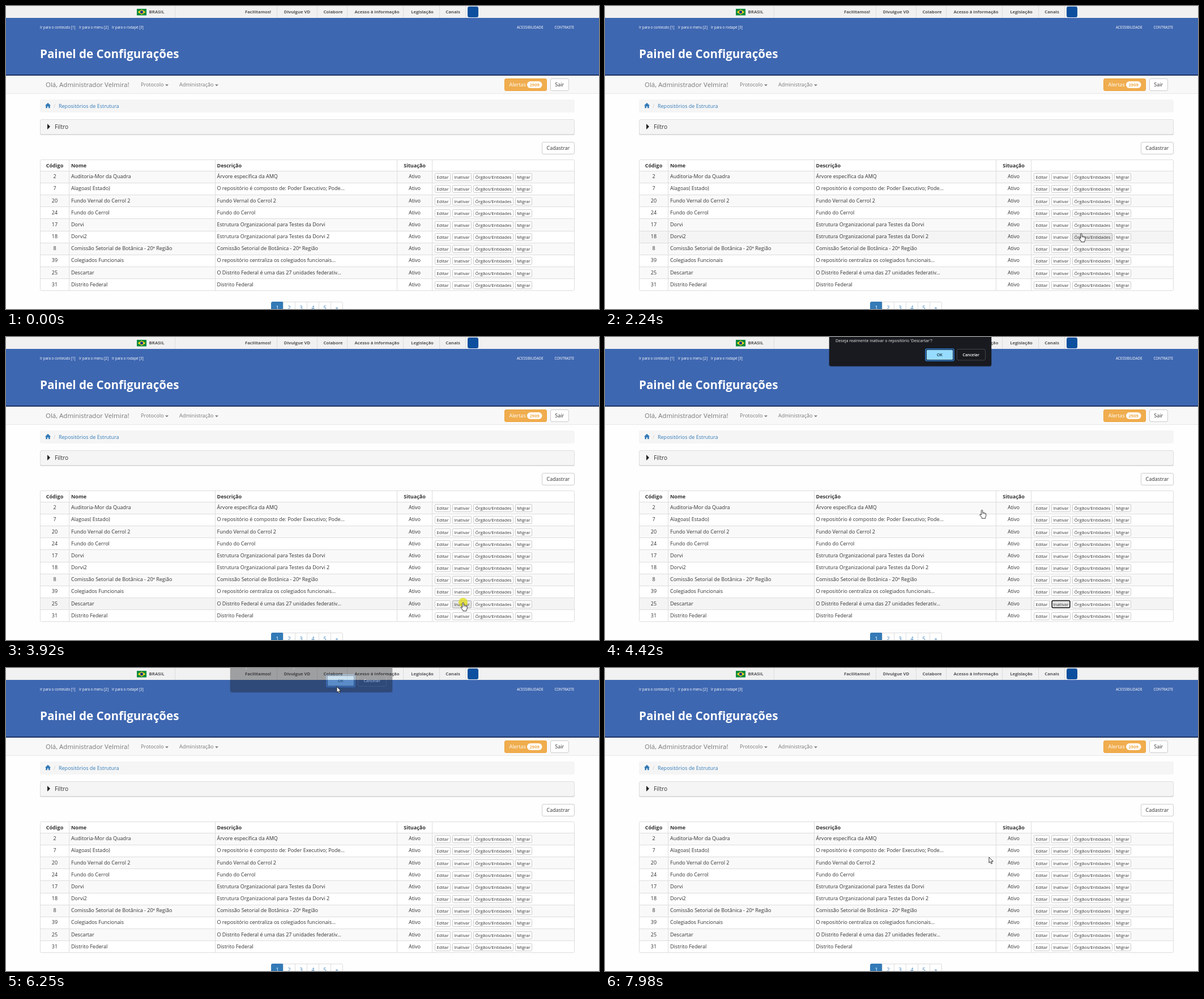
An HTML page that plays this animation: 1047x535 px, repeating every 8000 ms.

```html
<!DOCTYPE html>
<html lang="pt-BR">
<head>
<meta charset="utf-8">
<title>Repositórios de Estrutura</title>
<style>
  html, body { margin: 0; width: 100%; height: 100%; overflow: hidden; background: #fefefe; }
  svg { display: block; width: 1047px; height: 535px; font-family: "Open Sans", "Noto Sans", sans-serif; }
  text { white-space: pre; }
</style>
</head>
<body>
<svg id="stage" viewBox="0 0 1047 535"></svg>
<script>
const LOOP = 8000;
const stage = document.getElementById('stage');

function add(tag, attrs, parent = stage) {
  const node = document.createElementNS('http://www.w3.org/2000/svg', tag);
  for (const key in attrs) node.setAttribute(key, attrs[key]);
  return parent.appendChild(node);
}
const rect = (x, y, width, height, fill, extra = {}, parent) =>
  add('rect', { x, y, width, height, fill, ...extra }, parent);
const path = (d, fill, extra = {}, parent) => add('path', { d, fill, ...extra }, parent);
function text(x, y, content, size = 9, fill = '#333', extra = {}, parent) {
  const node = add('text', { x, y, 'font-size': size, fill, ...extra }, parent);
  node.textContent = content;
  return node;
}
const middle = { 'text-anchor': 'middle' };
const bold = { 'font-weight': 700 };
const boldMiddle = { ...middle, ...bold };
const box = (stroke, rx) => ({ stroke, rx });

// Government bar
rect(0, 0, 1047, 21, '#f1f1f1');
rect(231, 5, 17, 11.5, '#008a3e');
path('M232.5 10.7L239.5 6.3L246.5 10.7L239.5 15.2Z', '#f8d31c');
add('circle', { cx: 239.5, cy: 10.7, r: 2.6, fill: '#1f3a86' });
text(252.5, 13.4, 'BRASIL', 7.8, '#555', bold);
for (const x of [298, 478, 549, 602, 701, 765, 811]) rect(x, 0, 1, 21, '#dcdcdc');
[[445, 'Facilitamos!'], [514, 'Divulgue VD'], [577.5, 'Colabore'], [655, 'Acesso à informação'],
 [735, 'Legislação'], [789, 'Canais']]
  .forEach(([x, label]) => text(x, 13, label, 7.7, '#555', boldMiddle));
rect(815, 1, 19, 19, '#0c4f9e', { rx: 3 });

// Header
rect(0, 21, 1047, 101, '#3e67b1');
rect(0, 121, 1047, 2, '#1f3564');
[[60, 'Ir para o conteúdo [1]'], [129, 'Ir para o menu [2]'], [187, 'Ir para o rodapé [3]'],
 [902, 'ACESSIBILIDADE'], [968.5, 'CONTRASTE']]
  .forEach(([x, label]) => text(x, 40, label, 6.2, '#fff'));
text(60, 91.5, 'Painel de Configurações', 20.6, '#fff', bold);

// Navigation
rect(0, 123, 1047, 32, '#f8f8f8');
rect(0, 154, 1047, 1, '#e7e7e7');
text(70, 143, 'Olá, Administrador Velmira!', 11.5, '#777');
text(238, 142.3, 'Protocolo', 9, '#777');
text(306, 142.3, 'Administração', 9, '#777');
for (const x of [281, 369]) path(`M${x} 138.5h6l-3 3Z`, '#777');
rect(880.5, 128.5, 74, 21, '#f0ad4e', box('#eea236', 2.5));
text(888.5, 142.3, 'Alertas', 9, '#fff');
rect(920, 133, 26.5, 12, '#fff', { rx: 6 });
text(933.2, 141.9, '2909', 7.7, '#f0ad4e', boldMiddle);
rect(961.5, 128.5, 32, 21, '#fff', box('#ccc', 2.5));
text(977.3, 142.3, 'Sair', 9, '#333', middle);

// Breadcrumb, filter, action
rect(60, 165, 944, 23, '#f5f5f5', { rx: 2.5 });
path('M74 171L79 175.8H77.7V180.3H75V177.3H73V180.3H70.3V175.8H69Z', '#337ab7');
text(84, 179.6, '/', 9, '#ccc');
text(93, 179.6, 'Repositórios de Estrutura', 9, '#337ab7');
rect(60, 202, 944, 26, '#d9d9d9', { rx: 2.5 });
rect(60.5, 200.5, 943, 26, '#f5f5f5', box('#ddd', 2.5));
path('M73 208L78 213L73 218Z', '#222');
text(86, 216.8, 'Filtro', 10.2);
rect(946.5, 240.5, 57, 21, '#fff', box('#ccc', 2.5));
text(975, 254.3, 'Cadastrar', 9, '#333', middle);

// Table
const TOP = 291.3, PITCH = 21.17;
const entries = [
  [2, 'Auditoria-Mor da Quadra', 'Árvore específica da AMQ'],
  [7, 'Alagoas( Estado)', 'O repositório é composto de: Poder Executivo; Pode...'],
  [20, 'Fundo Vernal do Cerrol 2', 'Fundo Vernal do Cerrol 2'],
  [24, 'Fundo do Cerrol', 'Fundo do Cerrol'],
  [17, 'Dorvi', 'Estrutura Organizacional para Testes da Dorvi'],
  [18, 'Dorvi2', 'Estrutura Organizacional para Testes da Dorvi 2'],
  [8, 'Comissão Setorial de Botânica - 20ª Região', 'Comissão Setorial de Botânica - 20ª Região'],
  [39, 'Colegiados Funcionais', 'O repositório centraliza os colegiados funcionais...'],
  [25, 'Descartar', 'O Distrito Federal é uma das 27 unidades federativ...'],
  [31, 'Distrito Federal', 'Distrito Federal']
];
const actions = [['Editar', 757, 28], ['Inativar', 788, 34], ['Órgãos/Entidades', 825, 71], ['Migrar', 899, 30]];
const TARGET_ROW = 8, TARGET_ACTION = 1;

rect(60, 271, 944, 20, '#fff');
text(86, 284.6, 'Código', 9, '#333', boldMiddle);
text(115, 284.6, 'Nome', 9, '#333', bold);
text(372.5, 284.6, 'Descrição', 9, '#333', bold);
text(721.5, 284.6, 'Situação', 9, '#333', boldMiddle);

const rows = entries.map(([code, name, description], i) => {
  const top = TOP + i * PITCH;
  const line = Math.floor(top);
  const plain = i % 2 ? '#fff' : '#f9f9f9';
  const back = rect(60, line, 944, 22, plain);
  rect(60, line, 944, 1, '#ddd');
  text(86, top + 13, code, 9, '#333', middle);
  text(115, top + 13, name);
  text(372.5, top + 13, description);
  text(721.5, top + 13, 'Ativo', 9, '#333', middle);
  const buttons = actions.map(([label, x, w]) => {
    const face = rect(x + .5, Math.round(top + 4) + .5, w - 1, 13, '#fff', box('#ccc', 1.8));
    text(x + w / 2, top + 14, label, 7.7, '#333', middle);
    return face;
  });
  return { top, plain, back, buttons };
});
for (const x of [111, 369, 690, 752]) rect(x, 271, 1, 232, '#ddd');
rect(60.5, 271.5, 943, 231, 'none', box('#ddd', 2));

const focusRing = add('g');
rect(788.5, 464.8, 33, 14, 'none', { stroke: '#fff', rx: 2.5 }, focusRing);
rect(789.2, 465.5, 31.6, 12.6, 'none', { stroke: '#101010', 'stroke-width': 1.5, rx: 2 }, focusRing);

// Pagination
['1', '2', '3', '4', '5', '»'].forEach((label, i) => {
  const x = 468.5 + i * 21;
  rect(x, 522.5, 21, 21, i ? '#fff' : '#337ab7', box(i ? '#ddd' : '#337ab7', i % 5 ? 0 : 2));
  text(x + 10.5, 536.3, label, 9, i ? '#337ab7' : '#fff', middle);
});

// Confirmation dialog
const dialog = add('g');
rect(395, -20, 288, 72.5, '#000', { rx: 4, opacity: .25 }, dialog);
rect(396, -20, 286, 71.5, '#181a1f', { rx: 3.5 }, dialog);
text(407, 9, "Deseja realmente inativar o repositório 'Descartar'?", 7.17, '#f2f2f2', {}, dialog);
rect(566, 21, 50, 21, '#101216', { stroke: '#2f7fd6', 'stroke-width': 1.6, rx: 2.5 }, dialog);
const okFace = rect(567.8, 22.8, 46.4, 17.4, '#97dcff', { rx: 1.5 }, dialog);
text(590.8, 33.8, 'OK', 7.2, '#12303f', { ...middle, 'font-weight': 600 }, dialog);
rect(621.5, 21.5, 50, 19.5, '#181a1f', box('#42454b', 2.5), dialog);
text(646.2, 33.8, 'Cancelar', 7, '#fff', { ...middle, 'font-weight': 600 }, dialog);

// Pointer: origin is the hot spot
const pulse = add('circle', { r: 8, fill: '#e2de10', opacity: .72 });
const pointer = add('g');
const outline = { stroke: '#222', 'stroke-width': .9, 'stroke-linejoin': 'round' };
const arrow = path('M0 0V10.2L2.4 8L4 11.8L5.7 11L4.1 7.4H7.3Z', '#fff', outline, pointer);
const hand = add('g', {}, pointer);
path('M-1.2 1.2Q0 -.6 1.2 1.2V5.2Q2.6 4.4 3.4 5.7Q4.7 5 5.3 6.3Q7 5.8 7.2 7.6V10.4Q7 12.6 5.9 13.6V15.3H-.2V13.8L-3.6 9.5Q-4 7.7 -2.4 8.1L-1.2 9.3Z',
  '#fff', outline, hand);
path('M1.2 5.2V8M3.4 5.8V8M5.3 6.4V8.3', 'none', { stroke: '#222', 'stroke-width': .6 }, hand);

// Pointer route: time, x, y
const route = [
  [0, 1030, 566], [160, 996, 536], [600, 850, 415], [960, 793, 379.5], [1030, 792, 376.2],
  [1170, 793, 373], [1350, 793, 373], [1490, 794, 371], [1830, 794, 371],
  [2630, 912, 448], [2650, 911, 449], [2990, 807, 468.5], [4100, 807, 468.5],
  [4420, 666, 305.5], [4520, 616, 239], [4900, 554, 110], [5330, 568, 45],
  [5400, 576, 41], [5560, 576, 41], [5740, 584, 33], [6370, 584, 33],
  [7160, 632, 234], [7980, 678, 334], [8000, 678, 334]
];
const OPEN = 4000, CLOSE = 6170, FADE = 130;
const clicks = [[3750, 3980], [5800, 6080]];

const samePlace = (a, b) => a[1] === b[1] && a[2] === b[2];
function slope(i, axis) {
  const before = route[i - 1], here = route[i], after = route[i + 1];
  if (!before || !after || samePlace(before, here) || samePlace(here, after)) return 0;
  return (after[axis] - before[axis]) / (after[0] - before[0]);
}
function positionAt(t) {
  const i = Math.max(0, route.findIndex(key => key[0] > t) - 1);
  const a = route[i], b = route[i + 1];
  const span = b[0] - a[0], u = (t - a[0]) / span, v = 1 - u;
  return [1, 2].map(axis =>
    v * v * (1 + 2 * u) * a[axis] + u * u * (3 - 2 * u) * b[axis] +
    span * u * v * (v * slope(i, axis) - u * slope(i + 1, axis)));
}
const clamp = n => Math.min(1, Math.max(0, n));
const show = (node, on) => node.setAttribute('visibility', on ? 'visible' : 'hidden');

function draw(t) {
  const [x, y] = positionAt(t);
  const modal = t >= OPEN && t < CLOSE;
  let overRow = -1, overAction = -1;
  if (modal) {
    overRow = TARGET_ROW;
    overAction = TARGET_ACTION;
  } else if (t < OPEN) {
    overRow = rows.findIndex(r => y >= r.top && y < r.top + PITCH);
    const dy = overRow < 0 ? 0 : y - rows[overRow].top;
    if (dy >= 4 && dy <= 17.6) overAction = actions.findIndex(([, left, w]) => x >= left && x <= left + w);
  }

  rows.forEach((row, i) => {
    row.back.setAttribute('fill', i === overRow ? '#f4f4f4' : row.plain);
    row.buttons.forEach((face, j) => {
      const over = i === overRow && j === overAction;
      face.setAttribute('fill', over ? '#e6e6e6' : '#fff');
      face.setAttribute('stroke', over ? '#adadad' : '#ccc');
    });
  });
  show(focusRing, modal);

  const shown = clamp((t - OPEN) / FADE) * clamp(1 - (t - CLOSE) / FADE);
  dialog.setAttribute('opacity', shown);
  dialog.setAttribute('transform', `translate(0 ${-14 * (1 - shown)})`);
  const overOk = y > 21 && y < 42 && x > 566 && x < 616;
  okFace.setAttribute('fill', overOk ? '#8bc9ee' : '#97dcff');

  const useHand = modal ? y > 51 : overAction >= 0;
  show(hand, useHand);
  show(arrow, !useHand);
  pointer.setAttribute('transform', `translate(${x} ${y})`);
  pulse.setAttribute('transform', `translate(${x} ${y})`);
  show(pulse, clicks.some(([from, to]) => t >= from && t < to));
}

const start = performance.now();
function tick(now) {
  draw(Math.max(0, now - start) % LOOP);
  requestAnimationFrame(tick);
}
draw(0);
requestAnimationFrame(tick);
</script>
</body>
</html>
```
